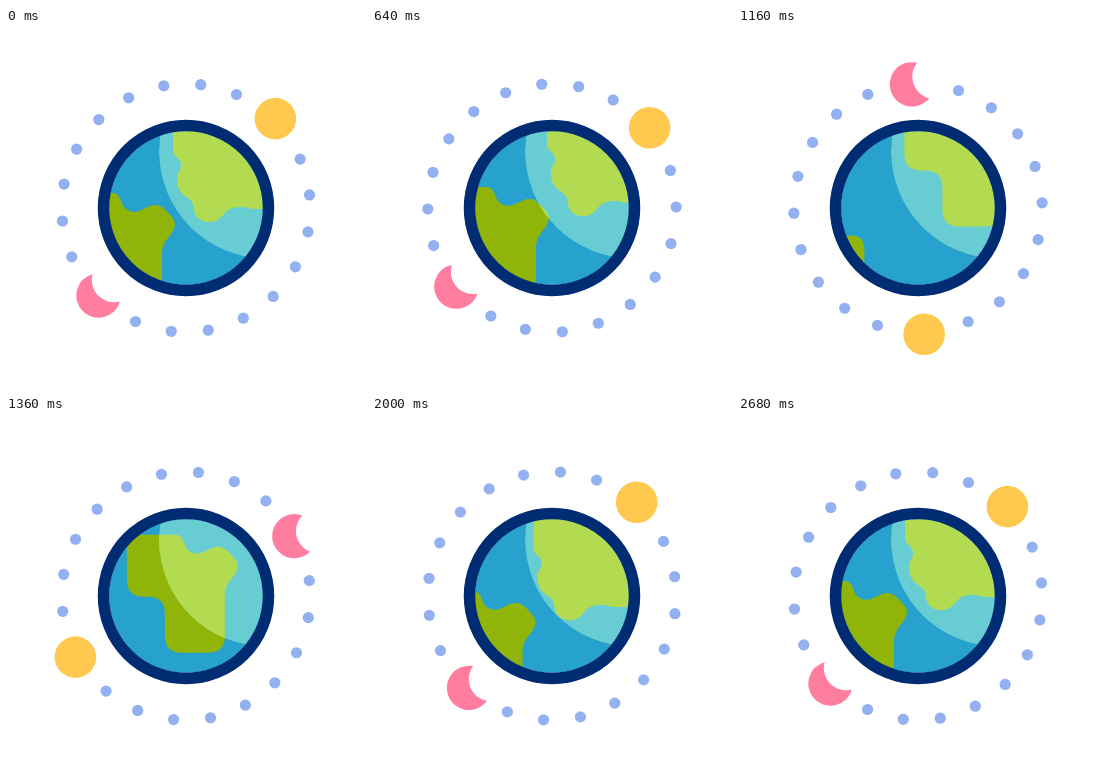
These frames come from a looping animation (360x360 px, 3000 ms). An HTML page with a canvas:

```html
<!DOCTYPE html>
<html lang="en">
<head>
<meta charset="utf-8">
<title>Earth, sun and moon</title>
<style>
  html, body { margin: 0; height: 100%; overflow: hidden; background: #fff; }
  canvas { display: block; width: 360px; height: 360px; }
</style>
</head>
<body>
<canvas></canvas>
<script>
const LOOP = 3000, RAD = Math.PI / 180, C = 180;
const scale = window.devicePixelRatio || 1;
const canvas = document.querySelector('canvas');
canvas.width = canvas.height = 360 * scale;
const ctx = canvas.getContext('2d');

const color = {
  ring: '#002c74', sea: '#27a2ce', litSea: '#68cdd3', land: '#90b508',
  litLand: '#b2db52', sun: '#ffc950', moon: '#ff7e9f', dot: '#93b0f0'
};

function disc(x, y, r) {
  const path = new Path2D();
  path.arc(x, y, r, 0, 2 * Math.PI);
  return path;
}

const globe = disc(C, C, 77);
const daylight = disc(260, 123.5, 107);

// Two continents that drift across the globe together
const land = new Path2D(`M135 119H170C180 119 178 130 184 135C196 143 203 131 213 131
  C221 131 225 138 230 143C235 149 233 154 229 160C224 166 220 171 220 180V220
  Q220 237 203 237H177Q160 237 160 220V198Q160 181 143 181H139Q122 181 122 164V133Q122 119 135 119Z`);
land.addPath(new Path2D(`M167 92V122C167 130 176 129 175 138C175 143 170 145 171 153
  C172 165 178 167 183 171C190 176 186 183 191 189C196 195 206 196 213 191
  C220 186 219 179 235 179C241 179 243 181 250 181H280Q291 181 291 170V149
  Q291 138 281 138H275Q262 138 262 124V106Q262 92 249 92Z`), { e: 64, f: -46 });
const repeat = { x: 244, y: -200 };

// Keys are [time, value], eased between neighbours
const orbitKeys = [[0, 0], [425, -10], [2197, 370], [2667, 360]];
const moonKeys = [[0, 0], [420, 0], [1560, 1], [2667, 0]];
const driftX = [[0, 180], [600, 192.5], [960, 65], [1775, -70.5], [2667, -64]];
const driftY = [[0, -154], [600, -164], [960, -56], [1775, 58], [2667, 46]];

function ease(keys, t) {
  const next = keys.findIndex(key => key[0] > t);
  if (next < 0) return keys[keys.length - 1][1];
  const [t0, a] = keys[next - 1], [t1, b] = keys[next];
  const p = (t - t0) / (t1 - t0);
  return a + (b - a) * p * p * (3 - 2 * p);
}

function fill(path, style) {
  ctx.fillStyle = style;
  ctx.fill(path);
}

function polar(radius, degrees) {
  return [C + radius * Math.cos(degrees * RAD), C + radius * Math.sin(degrees * RAD)];
}

// Disc with an equal disc cut away, the centres `gap` apart
function crescent(r, gap) {
  const path = new Path2D();
  const horn = Math.acos(gap / 2 / r);
  path.arc(0, 0, r, horn, -horn);
  path.arc(gap, 0, r, Math.PI + horn, Math.PI - horn, true);
  return path;
}

function drawLand(t, style) {
  const x = ease(driftX, t), y = ease(driftY, t);
  for (const n of [0, 1]) {
    ctx.save();
    ctx.translate(x - n * repeat.x, y - n * repeat.y);
    fill(land, style);
    ctx.restore();
  }
}

function drawEarth(t) {
  ctx.save();
  ctx.clip(globe);
  fill(globe, color.sea);
  drawLand(t, color.land);
  ctx.clip(daylight);
  fill(daylight, color.litSea);
  drawLand(t, color.litLand);
  ctx.restore();
  ctx.strokeStyle = color.ring;
  ctx.lineWidth = 11.5;
  ctx.stroke(disc(C, C, 82.5));
}

function drawOrbit(t) {
  const angle = ease(orbitKeys, t) - 45;
  const step = 360 / 21;
  for (const side of [90, 270]) {
    for (let i = -4; i <= 4; i++) {
      fill(disc(...polar(124.2, angle + 0.4 + side + i * step), 5.6), color.dot);
    }
  }
  fill(disc(...polar(126.4, angle), 20.8), color.sun);

  const phase = ease(moonKeys, t);
  ctx.save();
  ctx.translate(...polar(123.8, angle + 180));
  ctx.rotate((36 * phase - 45) * RAD);
  fill(crescent(22.2, 22 + 2.5 * phase), color.moon);
  ctx.restore();
}

function draw() {
  const t = performance.now() % LOOP;
  ctx.setTransform(scale, 0, 0, scale, 0, 0);
  ctx.fillStyle = '#fff';
  ctx.fillRect(0, 0, 360, 360);
  drawOrbit(t);
  drawEarth(t);
  requestAnimationFrame(draw);
}
draw();
</script>
</body>
</html>
```
